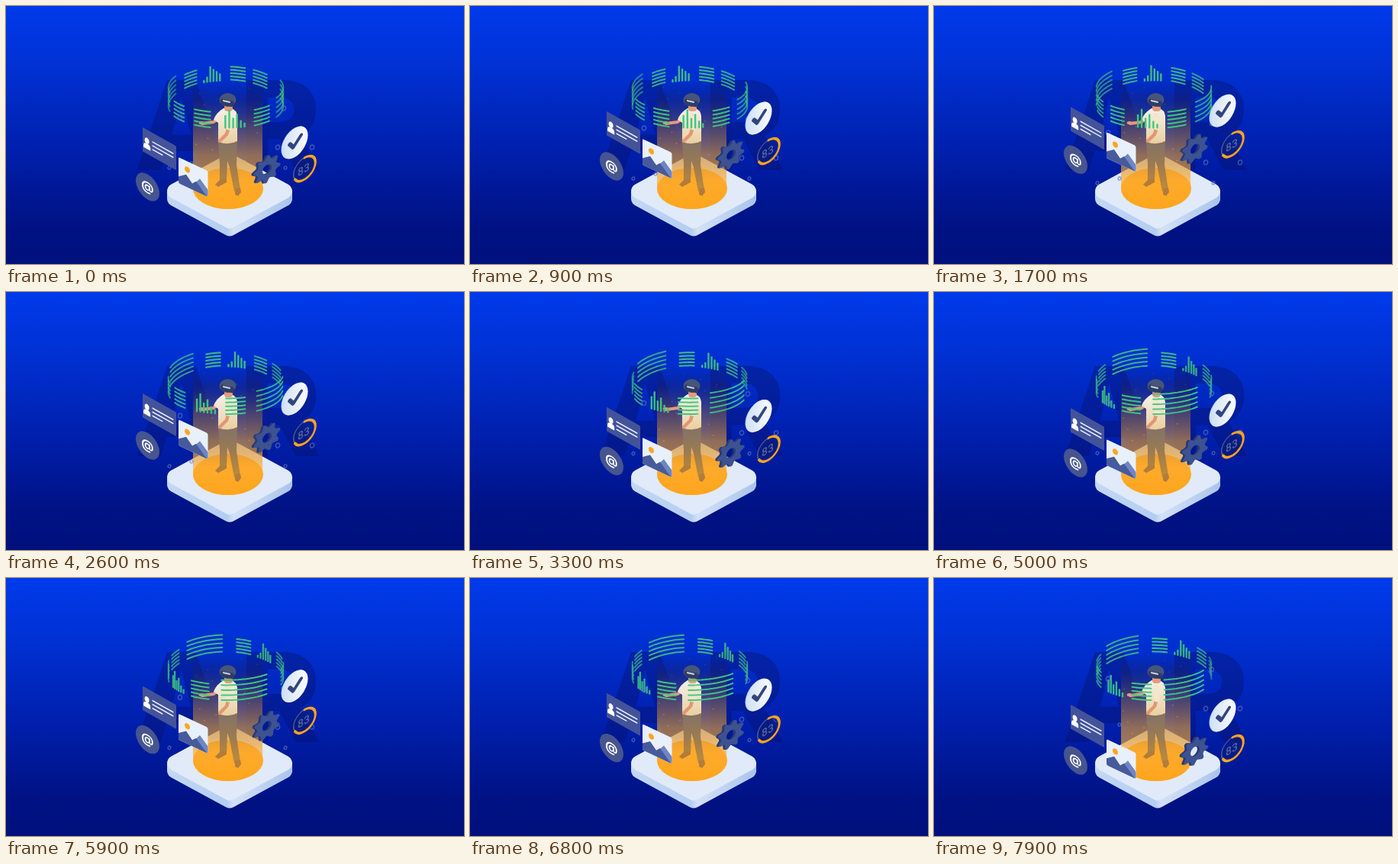
Animation, 600 px wide and 338 px high, one loop 8000 ms. Source, as an HTML page with a canvas:

```html
<!DOCTYPE html>
<html lang="en">
<head>
<meta charset="utf-8">
<title>AR scene</title>
<style>
html, body { margin: 0; width: 100%; height: 100%; overflow: hidden; background: #0022b4; }
canvas { display: block; width: 100vw; height: 100vh; }
</style>
</head>
<body>
<canvas id="stage" width="600" height="338"></canvas>
<script>
const ctx = document.getElementById('stage').getContext('2d');
const LOOP = 8, TURN = 5.95, TAU = Math.PI * 2, RAD = Math.PI / 180;

// Vertical positions of the floating parts at the shared key times.
const KEYS = [0, 0.9, 1.75, 2.6, 4, 5, TURN];
const FLOAT = {
  card: [159, 138, 132, 133, 166, 152, 141],
  at: [237, 210, 201, 201, 239, 224, 211],
  check: [179, 147, 137, 140, 180, 155, 141],
  photo: [198, 174, 165, 167, 211, 193, 177],
  gear: [214, 195, 187, 191, 227, 207, 193],
  dial: [213, 190, 181, 184, 223, 200, 186],
  bubble: [14, 28, 34, 30, 0, 13, 25]
};
const BUBBLES = [[228, 132], [364, 120], [356, 171], [401, 171], [243, 192], [366, 198], [214, 198]];

// Ring panels: angle from the back, kind, half width in degrees.
const PANELS = [
  [-16, 'bars', 9], [13, 'lines', 8], [40, 'lines', 9], [99, 'wide', 23], [143, 'lines', 9],
  [171, 'bars', 9], [202, 'lines', 8], [231, 'lines', 8], [273, 'wide', 21], [318, 'lines', 8]
];
const BARS_BACK = [0.2, 0.38, 1, 0.8, 0.65, 0.5];
const BARS_FRONT = [0.25, 0.4, 0.75, 0.55, 1, 0.7];

function curve(values, t) {
  let i = 0;
  while (i < KEYS.length - 2 && t > KEYS[i + 1]) i++;
  const slope = k => {
    const a = Math.max(0, k - 1), b = Math.min(KEYS.length - 1, k + 1);
    return (values[b] - values[a]) / (KEYS[b] - KEYS[a]);
  };
  const h = KEYS[i + 1] - KEYS[i], u = (t - KEYS[i]) / h, v = 1 - u;
  return v * v * (1 + 2 * u) * values[i] + u * u * (1 + 2 * v) * values[i + 1]
    + h * u * v * (v * slope(i) - u * slope(i + 1));
}

function gradient(x0, y0, x1, y1, ...stops) {
  const g = ctx.createLinearGradient(x0, y0, x1, y1);
  stops.forEach(([at, color]) => g.addColorStop(at, color));
  return g;
}

function fade(y0, y1, ...stops) {
  return gradient(0, y0, 0, y1, ...stops);
}

function poly(points, fill, stroke, width) {
  ctx.beginPath();
  points.forEach(([x, y], i) => i ? ctx.lineTo(x, y) : ctx.moveTo(x, y));
  if (fill) { ctx.closePath(); ctx.fillStyle = fill; ctx.fill(); }
  if (stroke) { ctx.strokeStyle = stroke; ctx.lineWidth = width; ctx.stroke(); }
}

function oval(x, y, rx, ry, fill) {
  ctx.beginPath();
  ctx.ellipse(x, y, rx, ry, 0, 0, TAU);
  ctx.fillStyle = fill;
  ctx.fill();
}

function box(x, y, w, h, r, fill) {
  ctx.beginPath();
  ctx.roundRect(x, y, w, h, r);
  ctx.fillStyle = fill;
  ctx.fill();
}

function label(text, x, y, font, fill, align = 'center') {
  ctx.font = font;
  ctx.fillStyle = fill;
  ctx.textAlign = align;
  ctx.fillText(text, x, y);
}

function skewed(x, y, slope, draw) {
  ctx.save();
  ctx.transform(1, slope, 0, 1, x, y);
  draw();
  ctx.restore();
}

function backdrop() {
  ctx.fillStyle = fade(0, 338, [0, '#003aea'], [0.2, '#0033d8'], [0.55, '#0020ae'], [0.85, '#001284'], [1, '#00107c']);
  ctx.fillRect(0, 0, 600, 338);
  const font = '800 162px Inter, sans-serif', tone = 'rgba(8,18,100,0.36)';
  label('A', 168, 215, font, tone, 'left');
  label('R', 413, 215, font, tone, 'right');
}

function ringPoint(deg) {
  const c = Math.cos(deg * RAD), near = 1 - 0.09 * c;
  return { x: 288 + 75 * near * Math.sin(deg * RAD), y: 119 - 31 * c, near };
}

function ring(turn, front) {
  for (const [base, kind, half] of PANELS) {
    const mid = base + turn, facing = Math.cos(mid * RAD);
    if (facing < 0 !== front) continue;
    const color = front ? '#3ec981' : '#40bb83';
    ctx.globalAlpha = 0.55 + 0.45 * Math.abs(facing);
    if (kind === 'bars') {
      (front ? BARS_FRONT : BARS_BACK).forEach((size, k) => {
        const p = ringPoint(mid + half * (k / 2.5 - 1)), h = 23 * size * p.near;
        box(p.x - 1.2, p.y + 10.5 - h, 2.4, h, 0.8, color);
      });
    } else {
      // Wide panels are taller and share their lower edge with the others.
      const gap = kind === 'wide' ? 6 : 4.7;
      for (let row = 0; row < 5; row++) {
        const points = [];
        for (let k = 0; k <= 12; k++) {
          const p = ringPoint(mid - half + half * k / 6);
          points.push([p.x, p.y + (9.2 - row * gap) * p.near]);
        }
        poly(points, null, color, 2);
      }
    }
  }
  ctx.globalAlpha = 1;
}

function platform() {
  const tile = (dy, color) => poly([[221, 242.5 + dy], [293, 203.5 + dy], [365, 242.5 + dy], [293, 281.5 + dy]], color, color, 20);
  const side = gradient(211, 0, 375, 0, [0, '#c3d8f6'], [0.48, '#b3cdf3'], [0.53, '#d3e1f7'], [1, '#a9c4ee']);
  for (let dy = 10; dy > 0; dy -= 2) tile(dy, side);
  tile(0, '#e0eaf8');
  oval(291, 239, 46, 27, '#ffa51f');
}

function beam(t) {
  ctx.beginPath();
  ctx.moveTo(245, 98);
  ctx.lineTo(245, 239);
  ctx.ellipse(290.5, 239, 45.5, 27, 0, Math.PI, 0, true);
  ctx.lineTo(336, 98);
  ctx.closePath();
  ctx.fillStyle = fade(98, 266,
    [0, 'rgba(20,25,90,0)'], [0.15, 'rgba(35,32,85,0.35)'], [0.35, 'rgba(125,92,82,0.55)'],
    [0.58, 'rgba(205,145,65,0.7)'], [0.78, 'rgba(252,172,50,0.68)'], [1, 'rgba(255,165,25,0.85)']);
  ctx.fill();
  for (let i = 0; i < 18; i++) {
    const x = 248 + (i * 37.7) % 86, rise = (i * 29.3 + t * 9) % 110;
    ctx.globalAlpha = 0.75 - rise / 180;
    oval(x, 210 - rise, 0.7, 0.7, '#ffb951');
  }
  ctx.globalAlpha = 1;
}

function person() {
  const pants = fade(176, 242, [0, '#80726a'], [0.5, '#9c7b50'], [1, '#bf8b3a']);
  poly([[278, 176], [303, 176], [302, 208], [307, 241], [299, 243], [293, 212], [290, 203], [289, 228], [280, 230], [280, 207]], pants);
  poly([[281, 227], [289, 227], [289, 231], [278, 237], [274, 234]], '#b07d3a');
  poly([[300, 239], [307, 238], [308, 244], [304, 249], [300, 247]], '#b07d3a');
  poly([[283, 143], [272, 152], [257, 154]], null, '#e59a7c', 4);
  oval(256, 153, 3.3, 2, '#e59a7c');
  ctx.beginPath();
  ctx.moveTo(285, 134);
  ctx.quadraticCurveTo(275, 140, 272, 149);
  ctx.lineTo(278, 153);
  ctx.lineTo(278, 178);
  ctx.quadraticCurveTo(292, 183, 303, 177);
  ctx.lineTo(303, 144);
  ctx.quadraticCurveTo(302, 136, 295, 134);
  ctx.closePath();
  ctx.fillStyle = fade(134, 181, [0, '#f2f1ed'], [1, '#eacf9c']);
  ctx.fill();
  poly([[292, 158], [289, 168], [280, 177]], null, '#e29672', 4.5);
  poly([[291, 143], [292, 159]], null, '#f3e6c9', 7);
  box(286, 127, 11, 11, 4, '#e59a7c');
  oval(290.5, 123, 11, 9, '#465579');
  skewed(281, 121, 0.22, () => {
    box(0, 0, 18, 8, 3, '#303c63');
    box(3, 1, 10, 2.4, 1, '#c3cde0');
  });
}

function card(y) {
  skewed(179, y, 0.56, () => {
    box(0, 0, 44, 31.5, 1, '#43539a');
    oval(5.6, 14.5, 3, 3.9, '#fff');
    box(1.2, 18, 9, 7, [4, 4, 0, 0], '#fff');
    [[13, 28], [18, 28], [23, 14]].forEach(([row, w]) => box(12.5, row - 2, w, 1.7, 0.8, '#eef2ff'));
  });
}

function atSign(y) {
  skewed(185.5, y, 0.56, () => {
    oval(0, 0, 15.5, 16.5, '#46558f');
    label('@', 0, 5, '700 16px Inter, sans-serif', '#fff');
  });
}

function photo(y) {
  skewed(226, y, 0.47, () => {
    box(0, 0, 38.5, 34, 2, '#e8f0fc');
    ctx.save();
    ctx.clip();
    poly([[14, 34], [28, 15], [40, 26], [40, 34]], '#6f86c2');
    poly([[-1, 35], [-1, 26], [10, 18], [18, 26], [23, 21], [38, 35]], '#475a9b');
    ctx.restore();
    oval(11.5, 11, 3.5, 3.8, '#ffa51f');
  });
}

function gear(y, turn) {
  const shape = (dx, color) => skewed(341 + dx, y, -0.5, () => {
    ctx.rotate(turn * RAD);
    ctx.beginPath();
    for (let k = 0; k < 32; k++) {
      const r = k % 4 < 2 ? 17.5 : 13, a = (k + (k % 2 ? -0.1 : 0.1)) * TAU / 32;
      ctx.lineTo(r * Math.cos(a), r * Math.sin(a));
    }
    ctx.closePath();
    ctx.moveTo(6, 0);
    ctx.arc(0, 0, 6, 0, TAU);
    ctx.fillStyle = color;
    ctx.fill('evenodd');
  });
  shape(-2, '#2a3a75');
  shape(-1, '#2a3a75');
  shape(1, '#3d5291');
}

function check(y) {
  skewed(377.5, y, -0.58, () => oval(0, 0, 17, 19, '#b9cff2'));
  skewed(378.5, y, -0.58, () => {
    oval(0, 0, 17, 19, gradient(-17, 0, 17, 0, [0, '#cfe0f7'], [0.8, '#f3f7fd']));
    poly([[-7, -2], [-2, 5], [8, -5]], null, '#33457f', 4.8);
  });
}

function dial(y) {
  skewed(391, y, -0.58, () => {
    const arc = (from, to, color, w) => {
      ctx.beginPath();
      ctx.arc(0, 0, 14.3, from, to);
      ctx.strokeStyle = color;
      ctx.lineWidth = w;
      ctx.stroke();
    };
    oval(0, 0, 13.5, 14, 'rgba(15,28,112,0.4)');
    arc(0, TAU, '#4b5a90', 1.6);
    arc(-TAU / 4, TAU * 0.42, '#ffa51f', 3);
    label('83', -1, 5.5, '500 14px Roboto, sans-serif', '#566799');
  });
}

function bubbles(shift) {
  ctx.strokeStyle = 'rgba(95,120,190,0.65)';
  ctx.lineWidth = 1.4;
  BUBBLES.forEach(([x, y], i) => {
    ctx.beginPath();
    ctx.ellipse(x, y + shift, i > 3 ? 1.8 : 2.6, i > 3 ? 2.1 : 3, 0.4, 0, TAU);
    ctx.stroke();
  });
}

function render(t) {
  const at = name => curve(FLOAT[name], t);
  const turn = 31 * (1 - Math.cos(Math.PI * (t + 0.35) / 6.3));
  ctx.lineCap = ctx.lineJoin = 'round';
  backdrop();
  ring(turn, false);
  platform();
  beam(t);
  person();
  ring(turn, true);
  bubbles(at('bubble'));
  card(at('card'));
  atSign(at('at'));
  photo(at('photo'));
  gear(at('gear'), turn);
  check(at('check'));
  dial(at('dial'));
}

const start = performance.now();
function tick() {
  const t = (performance.now() - start) / 1000 % LOOP;
  render(t > TURN ? 2 * TURN - t : t);
  requestAnimationFrame(tick);
}
tick();
</script>
</body>
</html>
```
